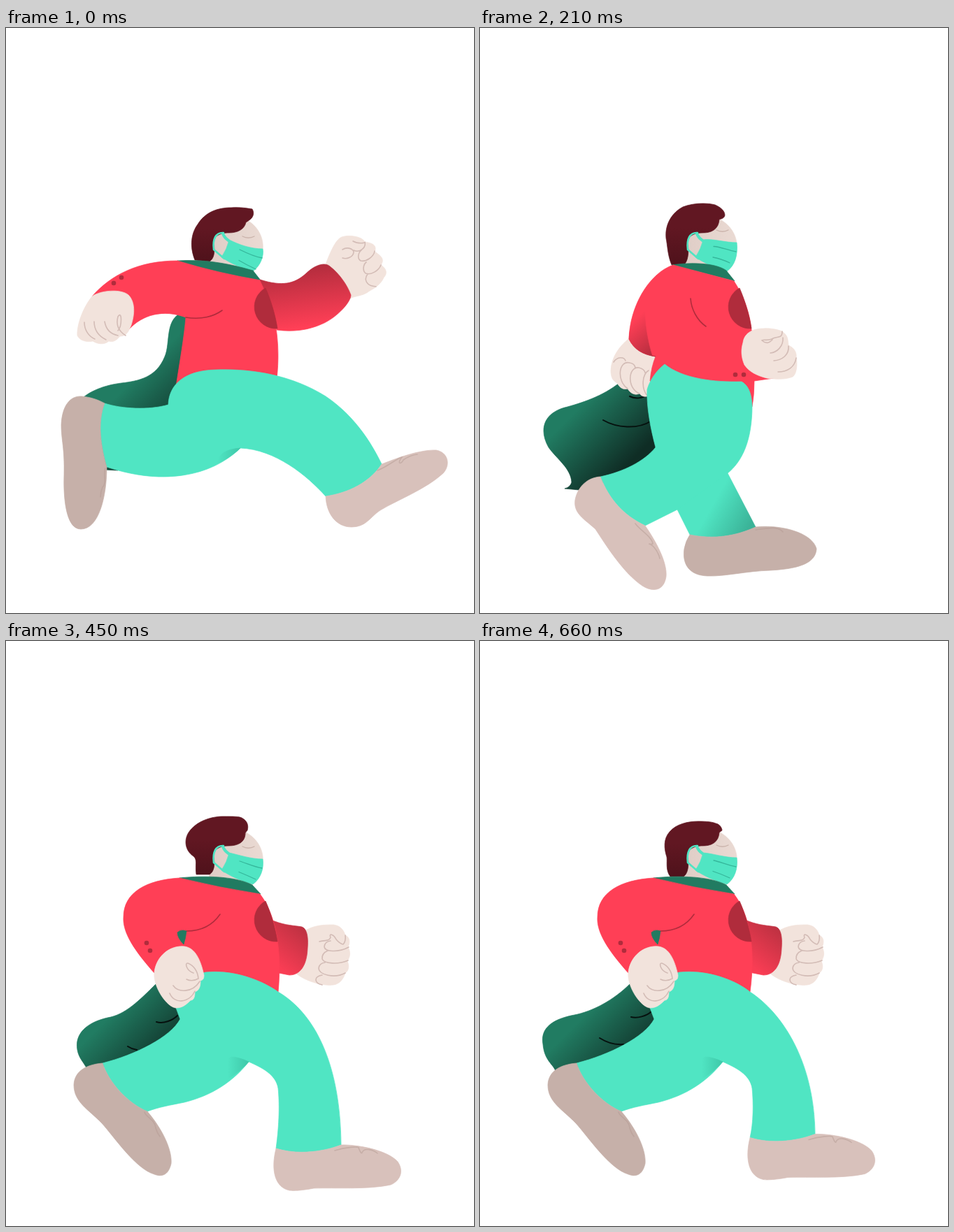
An HTML page that plays this animation: 669x837 px, repeating every 720 ms.

```html
<!DOCTYPE html>
<html lang="en">
<head>
<meta charset="utf-8">
<title>Running hero</title>
<style>
  html, body { margin: 0; width: 100%; height: 100%; overflow: hidden; background: #fff; }
  svg { display: block; width: 669px; height: 837px; }
</style>
</head>
<body>
<svg viewBox="0 0 669 837">
  <defs>
    <linearGradient id="cloth" gradientUnits="userSpaceOnUse" x1="340" y1="345" x2="415" y2="420">
      <stop stop-color="#217c62"/><stop offset="1" stop-color="#0f2d25"/>
    </linearGradient>
    <linearGradient id="hair" x2="0" y2="1">
      <stop offset=".4" stop-color="#611722"/><stop offset="1" stop-color="#4f121b"/>
    </linearGradient>
    <linearGradient id="face">
      <stop stop-color="#dfcdc6"/><stop offset="1" stop-color="#eadad3"/>
    </linearGradient>
    <linearGradient id="farArm" x1=".3" y1=".1" x2=".45" y2=".95">
      <stop stop-color="#b52d3e"/><stop offset="1" stop-color="#ff3f56"/>
    </linearGradient>
    <linearGradient id="farCuff" x1=".9" y1=".1" x2=".4" y2=".9">
      <stop stop-color="#b93040"/><stop offset="1" stop-color="#f93d54"/>
    </linearGradient>
    <linearGradient id="sleeve" x1=".4" y1=".1" x2=".8" y2="1">
      <stop offset=".1" stop-color="#ff3f56"/><stop offset="1" stop-color="#b52d3e"/>
    </linearGradient>
    <linearGradient id="fold">
      <stop stop-color="#50e5c3"/><stop offset="1" stop-color="#3fc8a9"/>
    </linearGradient>
    <linearGradient id="farLeg" gradientUnits="userSpaceOnUse" x1="335" y1="678" x2="388" y2="708">
      <stop stop-color="#50e5c3"/><stop offset="1" stop-color="#3bb398"/>
    </linearGradient>
  </defs>
  <g id="scene"></g>
</svg>
<script>
const RED = '#ff3f56', WINE = '#b02c3c', MINT = '#50e5c3', GREEN = '#217b61',
      SKIN = '#f2e3dc', KNUCKLE = '#d3bcb6', NEAR = '#d8c1bb', FAR = '#c6b0a9', CREASE = '#bda59e';

// The hairline stroke closes seams between neighbouring shapes.
const fill = (color, d) => `<path fill="${color}" stroke="${color}" stroke-width=".7" d="${d}"/>`;
const line = (color, d, width = 1.6) =>
  `<path fill="none" stroke="${color}" stroke-width="${width}" stroke-linecap="round" d="${d}"/>`;
const dots = (...spots) => spots.map(([x, y]) => `<circle cx="${x}" cy="${y}" r="3.3" fill="${WINE}"/>`).join('');
const emblem = fill(WINE, 'M371 372C378 388 385 410 388 430A31 31 0 0 1 371 372Z');

// Head: y is the height of the mask's front corner.
const skull = y =>
  fill('url(#face)', 'M298 290L343 274C360 283 369 300 367 318C366 334 360 343 352 349L325 350L290 340L297 300Z') +
  line('#cbb4ac', `M338 ${y - 18}C343 ${y - 15} 350 ${y - 15} 355 ${y - 18}`, 1.3);

const mask = y =>
  fill(MINT, `M319 303C333 ${y - 6} 350 ${y} 367 ${y}C369 326 364 340 353 348C335 343 322 337 308 328Q316 316 319 303Z`) +
  line(MINT, 'M318 304Q312 300 310 294', 4) +
  line(MINT, 'M311 293C300 292 295 302 297 317L312 330', 2.6) +
  line('#35b79b', `M334 ${(y + 318) / 2}C344 ${y + 6} 354 ${y + 11} 366 ${y + 13}M333 ${y / 2 + 174.5}Q344 ${y + 23} 357 ${y + 29}`, 1.3);

const hair = (bottom, outline) =>
  fill('url(#hair)', `M${outline}C341 288 331 293 319 293C303 293 296 300 297 308C299 322 297 ${bottom - 4} 291 ${bottom}Z`);

const hairs = [
  hair(334, '270 332C262 312 265 293 274 281C285 263 303 257 322 257C335 256 345 258 352 259C355 264 354 270 349 274Q345 277 343 278'),
  hair(337, '273 337C265 325 265 310 267 300C270 275 280 258 298 253C312 250 328 251 337 254C347 257 351 262 351 267C349 273 343 272 342 274'),
  hair(339, '274 339C268 325 268 310 266 301C264 280 275 264 290 256C305 250 325 250 336 253C345 257 350 262 350 268C349 273 344 273 342 274'),
  hair(337, '273 337C268 325 271 314 267 305C259 292 262 276 274 265C288 253 305 251 320 251C330 251 348 256 348 269Q344 274 342 275'),
  hair(334, '272 334C270 320 274 313 268 308C256 300 254 285 261 274C272 257 295 251 310 251C325 251 333 251 337 253C345 257 347 264 345 271Q341 275 342 277'),
  hair(337, '270 337C260 328 272 316 267 309C255 298 253 284 259 274C270 258 293 255 308 254C325 254 333 255 338 257C346 261 347 268 344 274L342 276'),
  hair(339, '275 339C265 330 270 318 267 309C258 300 259 287 263 278C272 262 295 259 306 258C325 258 330 258 336 260C345 262 347 269 345 272L341 277'),
  hair(337, '272 337C265 328 268 316 267 309C263 297 262 283 271 273C280 262 297 258 312 258C325 258 333 259 337 261C343 262 346 268 346 271L342 274')
];

const cape = (d, folds) => fill('url(#cloth)', d) + (folds ? line('#06110e', folds, 2) : '');
const capeLand = cape('M215 490C190 515 170 535 145 539C115 546 98 562 102 585C104 597 112 604 115 611L150 608L260 550L245 510Z',
  'M215 545C225 548 238 543 245 536M174 580Q180 584 187 585');
const capePass = cape('M205 503C180 525 150 535 125 542C90 550 84 575 98 600C110 617 130 630 131 650Q129 657 121 659L142 661L180 650L258 605L250 515Z',
  'M214 527C222 531 232 530 240 525M176 561C195 572 225 575 245 562');
const capeRise = cape('M215 490C190 515 160 530 135 535C103 541 86 554 90 577C92 600 104 605 108 615L150 608L260 550L245 510Z',
  'M216 538C225 540 238 537 245 530M171 568C182 575 195 578 205 577');
const capes = [
  cape('M258 405C225 412 236 450 227 470C215 500 190 505 165 508C140 511 120 520 110 529L140 632L160 633L250 545Z'),
  capeLand, capePass, capeRise,
  cape('M258 405C225 412 236 450 227 470C215 500 198 510 178 515C155 519 135 522 121 531L140 651C170 651 200 648 224 640L250 545Z'),
  capeLand, capePass, capeRise
];

const stretch =
  fill(GREEN, 'M245 333C280 331 312 335 353 347L364 361L300 352Z') +
  fill(RED, 'M245 333Q300 350 364 361C385 400 393 450 387 502L300 530L243 513C248 480 255 440 257 414C225 402 195 410 176 431L123 384C150 353 190 333 245 333Z') +
  fill(SKIN, 'M455 343C462 325 470 303 480 299C488 296 508 297 513 306C527 308 530 313 527 320C540 328 540 333 536 339C545 345 545 352 540 357C537 365 528 372 520 376C508 385 500 382 490 388L470 370Z') +
  line(KNUCKLE, 'M481 317C487 313 495 315 497 320C497 328 487 331 481 329M496 305C503 309 514 308 513 306C515 315 505 322 497 318M527 319C526 327 515 335 507 333C502 330 503 322 508 318M536 339C533 347 522 354 514 351C509 347 511 338 515 335M517 352C511 360 515 369 529 370') +
  fill('url(#farArm)', 'M363 360C395 370 412 366 428 352C440 340 455 334 463 341C477 352 488 368 493 382C493 392 475 412 455 422C432 433 410 435 387 432C384 408 375 385 363 360Z') +
  emblem + line(WINE, 'M257 414C280 418 298 412 309 404') + dots([165, 357], [154, 365]) +
  fill(MINT, 'M232 539C233 510 255 490 300 489C360 487 414 500 457 527C497 554 521 591 537 624C520 650 490 665 457 670C430 640 385 603 335 601C305 630 265 643 218 642C190 641 165 635 144 628C136 600 130 565 141 537C165 545 205 547 232 539Z') +
  fill('url(#fold)', 'M335 601C325 611 312 619 302 623Q304 603 335 601Z') +
  fill(FAR, 'M141 537C130 565 136 600 144 628C144 670 133 717 107 717C85 717 82 670 83 640C84 600 79 590 79 568C80 540 92 526 108 527C120 528 130 531 141 537Z') +
  line(CREASE, 'M142 630C138 640 145 650 138 657Q135 664 135 671') +
  fill(NEAR, 'M537 624C555 617 590 603 615 604C632 607 636 625 625 637C600 660 560 675 535 690C520 700 515 714 494 714C472 714 458 695 457 670C490 665 520 650 537 624Z') +
  line('#c6aea7', 'M531 633C545 628 560 615 566 614C558 624 565 625 568 618Q578 611 588 610') +
  fill(SKIN, 'M123 384C135 375 165 373 175 382C185 392 184 410 179 425C175 435 172 441 163 441C158 447 153 450 147 448C140 454 130 452 124 448C115 450 105 447 102 440C101 425 110 400 123 384Z') +
  line(KNUCKLE, 'M112 421C112 432 118 441 127 445M126 420C126 432 133 441 143 446M141 420C143 432 150 438 160 440M160 433C166 427 166 403 160 413C157 424 160 433 171 440');

// Both mid-stride poses; lift raises the front foot.
const stride = lift =>
  fill(SKIN, 'M425 416C440 406 455 406 468 406C478 407 483 414 485 421C492 424 492 432 489 438C493 445 492 452 488 458C491 465 490 472 485 475C482 485 476 491 468 492C455 494 430 488 415 476Z') +
  line(KNUCKLE, 'M448 430C455 428 462 430 464 424C461 418 468 419 472 427Q477 433 482 434Q486 430 485 421M490 438C475 446 455 445 455 437Q456 430 464 429M489 457C475 463 455 462 452 455Q451 447 460 443M485 475C470 483 447 478 447 468Q448 461 456 460M452 478C440 480 440 489 452 492') +
  fill('url(#farCuff)', 'M370 396L384 401C400 407 412 407 423 409C432 412 432 430 431 440C430 465 420 478 405 478L390 475L370 470Z') +
  fill(GREEN, 'M248 339C285 335 330 337 352 349L364 362L300 355Z') +
  fill(RED, `M248 339Q305 353 363 362C381 385 396 430 ${389 - lift / 5} 503L300 530L245 500L212 475C190 450 166 420 168 395C168 360 200 342 248 339Z`) +
  emblem + line(WINE, 'M258 415C280 415 295 407 306 391') + dots([201, 432], [206, 443]) +
  fill(GREEN, 'M245 417Q250 412 258 415Q257 425 254 434Q245 425 245 417Z') +
  fill(MINT, `M249 541L243 525C250 500 265 478 285 474C325 470 365 485 ${389 - lift / 5} 502C${440 - lift / 2} 532 478 602 479 ${721 - lift}C450 ${732 - lift} 415 ${735 - lift} 386 ${726 - lift}C391 690 391 660 389 640C386 620 365 610 347 602C325 630 295 650 255 660C235 664 218 667 202 673C175 662 147 632 138 604C185 592 235 567 249 541Z`) +
  fill('url(#fold)', 'M347 602Q335 616 318 626Q314 596 322 595Q332 595 347 602Z') +
  fill(FAR, 'M138 604C147 632 175 662 202 673C225 700 238 730 236 748C232 765 222 767 212 763C185 755 155 710 137 690C118 670 97 660 97 635C98 615 115 606 138 604Z') +
  line(CREASE, 'M198 674C200 682 213 684 214 697Q216 704 220 709') +
  `<g transform="translate(0 ${-lift})">` +
  fill(NEAR, 'M479 721C500 720 545 728 560 745C570 760 562 773 550 778C520 785 470 782 440 783C425 786 410 787 405 786C385 782 378 758 386 726C415 735 450 732 479 721Z') +
  line('#c6aea7', 'M470 729C485 724 505 723 504 725C505 728 508 735 509 732C512 724 525 728 531 733') + '</g>' +
  fill(SKIN, 'M212 474C215 450 235 435 255 437C270 439 278 455 283 478C283 484 281 485 278 486C278 495 276 500 270 502C270 510 268 514 264 514C258 520 252 525 243 525C230 524 210 495 212 474Z') +
  line(KNUCKLE, 'M268 475C258 472 255 460 260 461C268 464 274 472 275 483Q266 488 258 484M277 487C266 504 246 503 239 493M270 501C262 518 240 520 234 504');

const pass =
  fill(SKIN, 'M212 445C200 455 188 470 187 490C187 500 190 505 196 508C200 515 205 518 211 516C215 523 222 526 228 523C232 528 236 528 242 526L255 470Z') +
  line(KNUCKLE, 'M191 478C196 470 206 470 208 476M211 516C195 505 198 475 214 479Q221 480 222 486M228 523C209 515 212 484 227 486Q235 488 236 493M239 526C230 515 232 495 241 490') +
  fill(GREEN, 'M274 339C310 334 340 338 352 347L364 362Z') +
  fill(RED, 'M276 339L363 362C378 385 386 410 388 432L420 501L392 505Q392 525 389 542L300 560L243 505Q245 484 251 470C235 468 220 460 213 445C214 400 240 352 276 339Z') +
  fill('url(#sleeve)', 'M251 470C232 467 220 460 213 445C214 425 222 405 236 395C234 420 240 450 246 469Z') +
  emblem + line(WINE, 'M301 387C302 402 310 418 323 427') + dots([365, 496], [377, 496]) +
  fill('url(#farLeg)', 'M354 637L394 714C365 727 335 732 300 725L282 689L300 630Z') +
  fill(MINT, 'M264 481C290 502 335 507 374 506C385 512 388 525 389 540C389 590 375 620 354 637L282 689L236 712C205 697 185 675 172 642C205 635 235 620 251 600C243 570 238 540 239 517C244 500 255 488 264 481Z') +
  fill(FAR, 'M394 714C430 710 475 722 481 745C480 768 450 774 415 776C380 777 350 785 325 784C297 783 289 765 292 745Q294 734 300 725C335 732 365 727 394 714Z') +
  line(CREASE, 'M394 718C410 716 426 712 433 721') +
  fill(NEAR, 'M172 642C185 675 205 697 236 712C252 735 268 765 266 785C263 805 248 808 232 798C205 780 180 740 165 717C150 703 133 695 136 675C140 655 155 643 172 642Z') +
  line('#c6aea7', 'M222 709C228 718 246 728 247 738C240 740 240 735 248 742Q255 750 257 759') +
  fill(SKIN, 'M376 450C378 435 392 430 405 430C415 429 430 432 433 435C440 440 440 445 441 454C450 458 453 465 452 472C454 480 453 495 447 499C435 504 420 502 410 501C395 497 385 492 378 482C373 470 373 460 376 450Z') +
  line(KNUCKLE, 'M432 434C432 446 424 440 417 445C410 448 406 445 403 447C410 453 414 450 418 446M433 443C434 455 425 464 415 465M441 455C442 468 432 475 420 476M452 472C450 485 440 492 426 492');

const bodies = [stretch, stride(0), pass, stride(15.5)];
const maskHeights = [316, 312, 307, 310];

const POSE = 90, LAG = 30, LOOP = 720;
const scene = document.getElementById('scene');
let shown = '';

// The hair follows the body a moment later.
function draw(now) {
  const t = now % LOOP;
  const step = Math.floor(t / POSE);
  const trail = Math.floor(Math.max(0, t - LAG) / POSE);
  const key = step + ':' + trail;
  if (key !== shown) {
    const y = maskHeights[step % 4];
    scene.innerHTML = capes[step] + skull(y) + hairs[trail] + mask(y) + bodies[step % 4];
    shown = key;
  }
}

let start;
function tick(now) {
  start ??= now;
  draw(now - start);
  requestAnimationFrame(tick);
}
draw(0);
requestAnimationFrame(tick);
</script>
</body>
</html>
```
